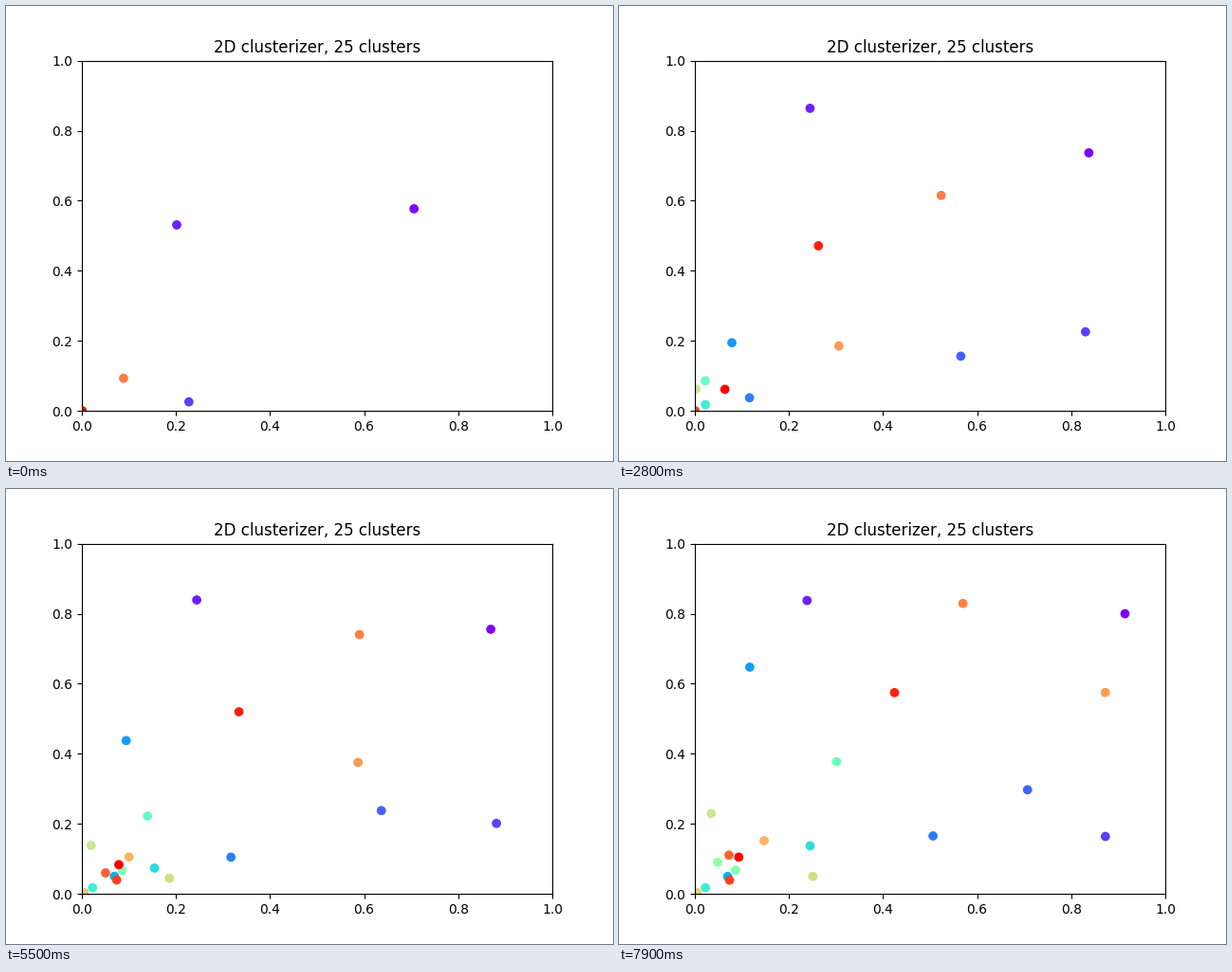
Recreate the animation shown at these times as a matplotlib script. Size 640 by 480 pixels, loop 8000 ms.

```python
import numpy as np
import matplotlib.pyplot as plt
from matplotlib.animation import FuncAnimation

FRAMES, INTERVAL = 80, 100
CLUSTERS = 25

rng = np.random.default_rng(7)
tracks = np.zeros((FRAMES, CLUSTERS, 2))


def path(cluster, birth, *points):
    """Rest at the origin until birth, then hop along points to the loop's end.

    Clusters settle as they learn, so the points lie closer in time early on.
    """
    points = np.array(points)
    t = np.arange(birth, FRAMES)
    knots = birth + (t[-1] - birth) * np.linspace(0, 1, len(points)) ** 2
    reach = np.hypot(*points[-1])
    hits = rng.random(len(t)) < 0.25 + 0.5 * reach
    hits[0] = True
    last_hop = np.maximum.accumulate(np.where(hits, t, 0))
    stray = rng.normal(0, 0.007 * reach, (FRAMES, 2))
    stray[birth] = 0
    for axis in range(2):
        line = np.interp(last_hop, knots, points[:, axis])
        tracks[birth:, cluster, axis] = line + stray[last_hop, axis]


# clusters 7, 10 and 14 never leave the origin
path(0, 0, (.706, .577), (.785, .73), (.84, .74), (.915, .80))
path(1, 0, (.2016, .531), (.24, .85), (.246, .849))
path(2, 0, (.2275, .026), (.72, .215), (.868, .235), (.87, .16))
path(3, 8, (.33, .12), (.56, .16), (.71, .30))
path(4, 16, (.02, .01), (.51, .167))
path(5, 8, (.03, .01), (.08, .21), (.11, .64))
path(6, 33, (.07, .05))
path(8, 30, (.097, .038), (.098, .038), (.25, .138))
path(9, 20, (.0225, .018))
path(11, 22, (.0175, .076), (.019, .094), (.30, .38))
path(12, 30, (.086, .068))
path(13, 67, (.048, .09))
path(15, 14, (.003, .067), (.003, .055), (.035, .23))
path(16, 32, (.13, .036), (.25, .052))
path(17, 54, (.005, .004))
path(18, 40, (.08, .08), (.145, .15))
path(19, 6, (.06, .02), (.86, .57))
path(20, 0, (.0887, .0933), (.30, .48), (.60, .66), (.578, .83))
path(21, 43, (.04, .035), (.072, .11))
path(22, 53, (.074, .04))
path(23, 3, (.15, .15), (.24, .47), (.42, .57))
path(24, 15, (.055, .05), (.095, .105))

fig, ax = plt.subplots(figsize=(6.4, 4.8), dpi=100)
ax.set(xlim=(0, 1), ylim=(0, 1), title=f"2D clusterizer, {CLUSTERS} clusters")
colors = plt.get_cmap("rainbow")(np.linspace(0, 1, CLUSTERS))
dots = ax.scatter(*tracks[0].T, c=colors)


def update(frame):
    dots.set_offsets(tracks[frame])
    return dots,


anim = FuncAnimation(fig, update, frames=FRAMES, interval=INTERVAL,
                     repeat=True, repeat_delay=0)
plt.show()
```
